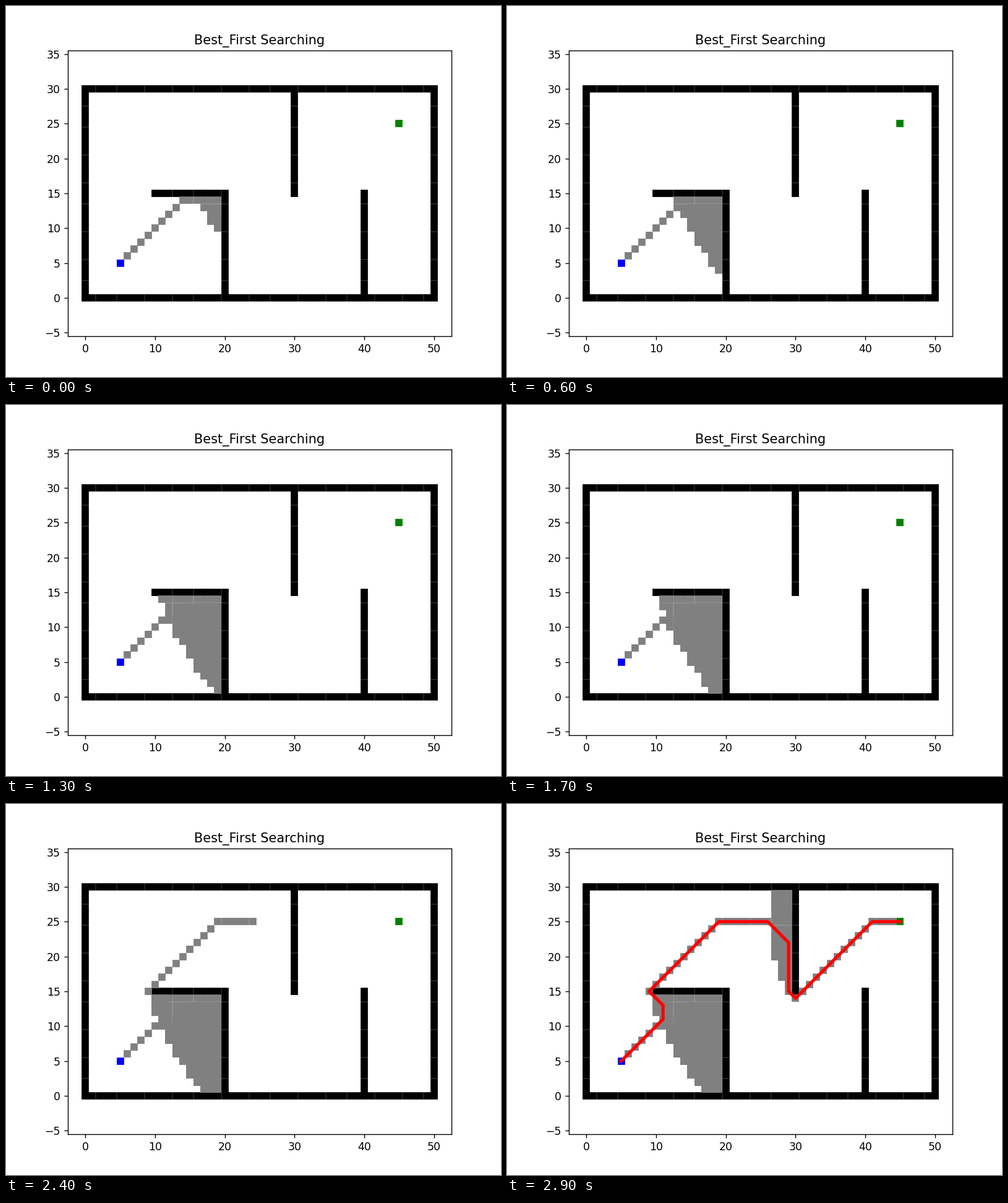
A matplotlib script that plays this animation: 800 px wide and 600 px high, repeating every 3 s.

```python
import math

import matplotlib.pyplot as plt
from matplotlib.animation import FuncAnimation

START, GOAL = (5, 5), (45, 25)
MOVES = [(-1, 0), (-1, 1), (0, 1), (1, 1), (1, 0), (1, -1), (0, -1), (-1, -1)]
FRAMES, INTERVAL = 30, 100
BATCH = 30  # cells plotted between two redraws


def make_walls():
    cells = [(x, y) for x in range(51) for y in (0, 30)]
    cells += [(x, y) for x in (0, 50) for y in range(1, 30)]
    cells += [(x, 15) for x in range(10, 21)]
    cells += [(20, y) for y in range(1, 15)]
    cells += [(30, y) for y in range(15, 30)]
    cells += [(40, y) for y in range(1, 16)]
    return cells


def search(walls):
    """Greedy best-first search that reopens cells when a cheaper way is found."""
    blocked = set(walls)
    cost, parent = {START: 0}, {START: START}
    queue, visited = [(math.dist(START, GOAL), START)], []
    while queue:
        best = min(queue)
        queue.remove(best)
        cell = best[1]
        visited.append(cell)
        if cell == GOAL:
            break
        for dx, dy in MOVES:
            near = (cell[0] + dx, cell[1] + dy)
            if near in blocked:
                continue
            new_cost = cost[cell] + math.hypot(dx, dy)
            if new_cost < cost.get(near, math.inf):
                cost[near] = new_cost
                parent[near] = cell
                queue.append((math.dist(near, GOAL), near))
    path = [GOAL]
    while path[-1] != START:
        path.append(parent[path[-1]])
    return visited[1:-1], path


def squares(cells, color):
    return ax.plot(*zip(*cells), "s", color=color)[0]


walls = make_walls()
visited, path = search(walls)

fig, ax = plt.subplots(figsize=(6.4, 4.8), dpi=125)
squares([START], "b")
squares([GOAL], "g")
squares(walls, "k")
ax.set_title("Best_First Searching")
ax.axis("equal")
explored = squares(visited, "gray")
route, = ax.plot(*zip(*path), color="r", linewidth=3)


def update(i):
    last = i == FRAMES - 1
    shown = visited if last else visited[:BATCH * (i + 1)]
    explored.set_data(*zip(*shown))
    route.set_visible(last)
    return explored, route


anim = FuncAnimation(fig, update, frames=FRAMES, interval=INTERVAL,
                     init_func=lambda: update(0), repeat=True, repeat_delay=0)
plt.show()
```
